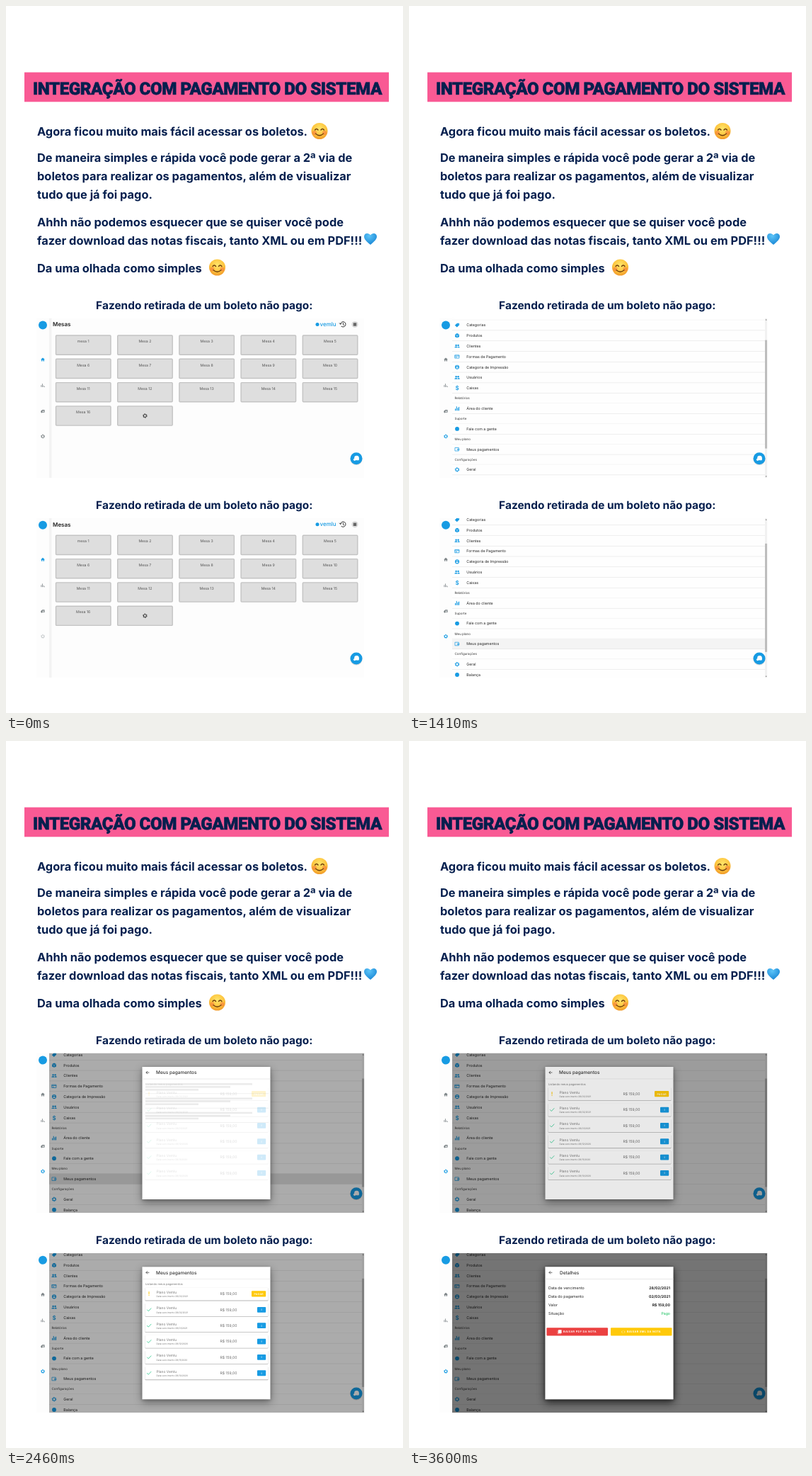
Recreate the animation shown at these times as an HTML page. Size 561 by 998 pixels, loop 3630 ms.

```html
<!DOCTYPE html>
<html lang="pt-BR">
<head>
<meta charset="utf-8">
<title>Integração com pagamento do sistema</title>
<style>
  html, body { margin: 0; width: 100%; height: 100%; overflow: hidden; background: #fff; }
  svg { display: block; width: 100%; height: 100%; font-family: Inter, "Open Sans", sans-serif; text-rendering: geometricPrecision; }
  .dialog { filter: drop-shadow(0 1px 2px rgba(0, 0, 0, .25)) drop-shadow(0 4px 6px rgba(0, 0, 0, .38)); }
</style>
</head>
<body>
<svg id="stage" viewBox="0 0 561 998"></svg>
<script>
const LOOP = 3630, STEP = 30, PANEL_GAP = 282.3, SCROLL = 48.5, RISE = 12.8;
const NAVY = '#051f4e', BLUE = '#179be3', GREY = '#7d8487', YELLOW = '#ffc90a';

// ---- drawing helpers -------------------------------------------------
const rect = (x, y, w, h, fill, extra = '') =>
  `<rect x="${x}" y="${y}" width="${w}" height="${h}" fill="${fill}" ${extra}/>`;
const circle = (x, y, r, fill, extra = '') =>
  `<circle cx="${x}" cy="${y}" r="${r}" fill="${fill}" ${extra}/>`;
const text = (x, y, size, str, fill = '#222', weight = 400, anchor = 'start', extra = '') =>
  `<text x="${x}" y="${y}" font-size="${size}" fill="${fill}" font-weight="${weight}" text-anchor="${anchor}" ${extra}>${str}</text>`;
const line = (d, width, color = 'currentColor') =>
  `<path d="${d}" fill="none" stroke="${color}" stroke-width="${width}" stroke-linecap="round" stroke-linejoin="round"/>`;
const shape = (d, fill = 'currentColor') => `<path d="${d}" fill="${fill}"/>`;
const group = (name, body, extra = '') => `<g class="${name}" ${extra}>${body}</g>`;
const at = (x, y, body, color = BLUE, scale = 1, name = '') =>
  `<g class="${name}" transform="translate(${x} ${y}) scale(${scale})" style="color:${color}">${body}</g>`;
const times = (n, fn) => Array.from({ length: n }, (_, i) => fn(i)).join('');

// Icons are centred on 0,0 and about 7 units wide.
const icons = {
  gear: circle(0, 0, 2.1, 'none', 'stroke="currentColor" stroke-width="1.2"') +
    circle(0, 0, 3, 'none', 'stroke="currentColor" stroke-width=".9" stroke-dasharray="1.7 1.44"'),
  home: shape('M-3.2 .1L0-2.9 3.2 .1H2.2V2.8H.7V.9H-.7V2.8H-2.2V.1Z'),
  chart: line('M-2.4 2.2V0M-.6 2.2V-2.2M1.2 2.2V.6M2.6 2.2H2.8', .9),
  truck: shape('M-3 1.9V-.4L-.8-2.2H2.8V1.9Z') + circle(.5, .2, 1, '#fff') + circle(-1.7, 1.9, .8, 'currentColor'),
  tag: shape('M-3.4 .4L.1-3 3-2.8 3.3-.2-.2 3.2Z') + circle(1.8, -1.6, .5, '#fff'),
  box: shape('M0-3.4L3.1-1.8V1.8L0 3.4-3.1 1.8V-1.8Z') + line('M-2.7-1.5L0 0 2.7-1.5M0 0V3', .5, '#fff'),
  people: circle(-1.5, -1.2, 1.3, 'currentColor') + circle(1.7, -1.2, 1.3, 'currentColor') +
    shape('M-3.7 2.3V1.4Q-1.5-.3 .4 1.4V2.3ZM.9 2.3V1.2Q2.6-.1 3.8 1.4V2.3Z'),
  card: line('M-3-2.2H3V2.3H-3ZM-3-.8H3M-2 1H-.6', .8),
  print: circle(0, 0, 3.2, 'currentColor') + rect(-1.6, .1, 3.2, 1.7, '#fff') + rect(-1.5, -2, 3, .8, '#fff'),
  money: text(0, 3, 8.4, '$', 'currentColor', 600, 'middle'),
  bars: line('M-2.6 2.7V.6M-.8 2.7V-2.7M1 2.7V-.7M2.7 2.7V-1.8', 1.1),
  dot: circle(0, 0, 3.1, 'currentColor'),
  wallet: line('M-2.8-2.3H2.4V2.5H-2.8ZM.8-.4H3V1.1H.8Z', .75),
  back: line('M2 0H-2M-.2-1.8L-2 0-.2 1.8', .7),
};

// ---- poster ----------------------------------------------------------
const smiley = (x, y) => at(x, y,
  circle(0, 0, 11.5, 'url(#face)') +
  circle(-7, 2.6, 3, '#f4663c', 'opacity=".45"') + circle(7, 2.6, 3, '#f4663c', 'opacity=".45"') +
  line('M-6.4-1.5Q-4.2-4.6-2-1.5M2-1.5Q4.2-4.6 6.4-1.5', 1.4, '#6b3b0c') +
  line('M-5.6 3.6Q0 9 5.6 3.6', 1.3, '#6b3b0c'));

const paragraphs = [
  [182.5, 'Agora ficou muito mais fácil acessar os boletos.'],
  [219.5, 'De maneira simples e rápida você pode gerar a 2ª via de'],
  [245.5, 'boletos para realizar os pagamentos, além de visualizar'],
  [271.5, 'tudo que já foi pago.'],
  [310.5, 'Ahhh não podemos esquecer que se quiser você pode'],
  [336.5, 'fazer download das notas fiscais, tanto XML ou em PDF!!!'],
  [375.5, 'Da uma olhada como simples'],
];

const poster =
  rect(26, 93.6, 515, 41.7, '#f95a94') +
  text(284.5, 125, 24.2, 'INTEGRAÇÃO COM PAGAMENTO DO SISTEMA', NAVY, 900, 'middle',
    `font-family="Roboto, sans-serif" letter-spacing="-.5" stroke="${NAVY}" stroke-width=".6"`) +
  paragraphs.map(([y, str]) => text(44, y, 16.4, str, NAVY, 700)).join('') +
  smiley(443, 176.5) + smiley(298.5, 369) +
  shape('M515 337C509 332 506 329 506 325.5C506 320 512.5 319.5 515 323.5C517.5 319.5 524 320 524 325.5C524 329 521 332 515 337Z', 'url(#heart)');

// ---- app screens -----------------------------------------------------
const sidebar = rect(43, 440, 18, 226, '#fdfdfd') + circle(52, 450.5, 6, BLUE) +
  at(52, 499, icons.home, GREY, .9, 'home') + at(52, 535.5, icons.chart, GREY, .9) +
  at(52, 572, icons.truck, GREY, .9) + at(52, 607.5, icons.gear, GREY, .85, 'settings');

const tables = rect(61, 440, 445, 226, '#fdfdfd') + rect(61, 440, 3.5, 226, '#f3f3f3') +
  text(66, 452.3, 8, 'Mesas', '#222', 600) +
  circle(440, 449.5, 2.5, BLUE) + text(443.5, 452, 8, 'vemlu', BLUE, 500) +
  at(476, 449.3, line('M-3.4-.5A3.7 3.7 0 1 1-2 3M-4.6-1.5L-3.4 0-2-1.2M.4-1.8V.3L1.8 1.2', 1), '#333') +
  circle(493, 449.5, 4.6, '#dcdcdc') + rect(490.8, 447.3, 4.4, 4.4, '#666') +
  times(17, i => {
    const x = 70.5 + 87.2 * (i % 5), y = 465 + 33.3 * Math.floor(i / 5);
    return rect(x, y, 77.5, 27.2, '#dedede', 'rx="1" stroke="#c3c3c3" stroke-width="1.4"') +
      (i < 16 ? text(x + 38.7, y + 10.2, 5.2, `${i ? 'Mesa' : 'mesa'} ${i + 1}`, '#555', 400, 'middle')
              : at(x + 38.7, y + 13.6, icons.gear, '#444', .95));
  });

const menuRows = [
  'Cadastros', ['tag', 'Categorias'], ['box', 'Produtos'], ['people', 'Clientes'],
  ['card', 'Formas de Pagamento'], ['print', 'Categoria de Impressão'], ['people', 'Usuários'], ['money', 'Caixas'],
  'Relatórios', ['bars', 'Área do cliente'],
  'Suporte', ['dot', 'Fale com a gente'],
  'Meu plano', ['wallet', 'Meus pagamentos'],
  'Configurações', ['gear', 'Geral'], ['dot', 'Balança'],
];

function menuList() {
  let y = 470;
  return menuRows.map(row => {
    const heading = typeof row === 'string', height = heading ? 14 : 14.8, mid = y + height / 2;
    const active = row[1] === 'Meus pagamentos' ?
      group('hover', rect(61, y, 442, height, '#f4f4f4')) + group('ripple', rect(61, y, 0, height, '#000', 'opacity=".16"')) : '';
    y += height;
    return active + rect(61, y - .25, 442, .5, heading ? '#ececec' : '#dcdcdc') + (heading
      ? text(64.5, mid + 1.6, 4.5, row, '#333')
      : at(68, mid, icons[row[0]], BLUE, .95) + text(81.3, mid + 1.9, 5.25, row[1]));
  }).join('');
}

const menu = rect(61, 440, 445, 226, '#fefefe') +
  group('scroller',
    circle(75.7, 454, 10, '#13b5dc') +
    text(496, 448.8, 5.1, '<tspan font-weight="700">Bar Tulveca</tspan> #2080', '#333', 400, 'end') +
    text(496, 454.8, 4.4, '12.345.678/0001-00', '#444', 400, 'end') +
    text(496, 460.5, 3.9, 'Logado como Usuário', '#444', 400, 'end') +
    rect(61, 466, 442, .5, '#e2e2e2') + menuList()) +
  rect(503, 440, 3.3, 226, '#f1f1f1') + group('thumb', rect(503, 445, 3.3, 153, '#bdbdbd')) +
  shape('M503.7 443.5L504.7 442 505.7 443.5ZM503.7 663.5L504.7 665 505.7 663.5Z', '#666');

const fab = circle(495, 639.5, 8.6, '#000', 'opacity=".15"') + circle(495, 638.7, 8.5, BLUE) +
  circle(495.5, 638, 3.3, '#fff') + rect(495.5, 638, 3.3, 3.3, '#fff', 'rx=".5"') + circle(492.7, 640.3, 1.7, '#fff');

const dialogFrame = (title, x, content) =>
  rect(192.5, 460, 181, 187, '#fff', 'class="dialog"') +
  at(200, 468, icons.back, '#333') + text(x, 470.3, 6.5, title, '#333', 500) +
  rect(192.5, 476.7, 181, .7, '#dedede') + content;

const skeleton = times(3, i => {
  const y = 483.1 + 20.3 * i;
  return [151, 120, 75].map((w, k) => rect(197, y + 4 * k, w, 2.5, '#e6e6e6')).join('') +
    rect(197, y + 14.5, 174, .5, '#dcdcdc');
});

const dueDates = ['28/03/2021', '28/02/2021', '28/01/2021', '28/12/2020', '28/11/2020', '28/10/2020'];
const payments = rect(193, 477.5, 180, 169, '#fff') +
  text(197, 485.6, 4.05, 'Listando meus pagamentos', '#777') +
  dueDates.map((date, i) => {
    const y = 498 + 22.35 * i;
    return rect(196.5, y - 8.6, 174, 18.7, '#b5b5b5', 'rx="1"') + rect(196.5, y - 9, 174, 18.3, '#fff', 'rx="1"') +
      text(212.5, y - .3, 4.9, 'Plano Vemlu', '#777') +
      text(212.5, y + 5, 3.25, `Data vencimento ${date}`, '#777') +
      text(302.5, y + 2, 5.1, 'R$ 159,00', '#666') +
      (i ? line(`M199.5 ${y + .3}l1.8 1.9 3.7-4`, .8, '#2ecc8f') +
           rect(355, y - 3.7, 12.2, 7.8, BLUE, 'rx="1"') + text(361, y + 1.7, 4.3, 'i', '#fff', 600, 'middle')
         : text(202, y + 3, 8, '!', YELLOW, 600, 'middle') +
           rect(347, y - 4, 20.2, 8.2, YELLOW, 'rx="1"') +
           text(357.2, y + 1.5, 3.6, 'PAGAR', '#fff', 600, 'middle', 'letter-spacing=".3"'));
  }).join('');

const detailRows = [
  ['Data de vencimento', '28/02/2021'], ['Data do pagamento', '02/03/2021'], ['Valor', 'R$ 159,00'], ['Situação', 'Pago'],
];
const fileButton = (x, fill, label) => rect(x, 546, 86.5, 11.3, fill, 'rx="1"') +
  text(x + 47, 553.2, 3.9, label, '#fff', 600, 'middle', 'letter-spacing=".3"');
const details = detailRows.map(([label, value], i) => {
  const y = 491.5 + 12.1 * i, paid = value === 'Pago';
  return text(197, y, 5.4, label) + text(369, y, 5.2, value, paid ? '#2dc76d' : '#222', paid ? 500 : 700, 'end');
}).join('') +
  fileButton(194.5, '#eb4141', 'BAIXAR PDF DA NOTA') + rect(211, 549, 4.6, 4.6, '#fff', 'rx=".5"') +
  line('M210.2 550V554.5H214.5', .5, '#fff') +
  fileButton(285, YELLOW, 'BAIXAR XML DA NOTA') + line('M301.5 550.5l-1.2 1.3 1.2 1.3M304 550.5l1.2 1.3-1.2 1.3', .5, '#fff');

const backdrop = name => group(name, rect(61, 440, 445.5, 226, '#000'));

const panel = index => group('panel',
  text(280.3, 428, 15.45, 'Fazendo retirada de um boleto não pago:', NAVY, 700, 'middle') +
  group('', sidebar + group('', tables + group('menu', menu) + fab +
    backdrop('shade1') +
    group('list', dialogFrame('Meus pagamentos', 212, skeleton + group('payments', payments))) +
    backdrop('shade2') +
    group('details', dialogFrame('Detalhes', 213, details)), 'clip-path="url(#page)"'),
    'clip-path="url(#screen)"'),
  `transform="translate(0 ${index * PANEL_GAP})"`);

const stage = document.getElementById('stage');
stage.innerHTML = `<defs>
  <radialGradient id="face" cx=".5" cy=".35" r=".68"><stop offset="0" stop-color="#ffe66b"/><stop offset=".6" stop-color="#fdc53f"/><stop offset="1" stop-color="#ef9426"/></radialGradient>
  <radialGradient id="heart" cx=".4" cy=".25" r=".8"><stop offset="0" stop-color="#5cc4f8"/><stop offset="1" stop-color="#1583d3"/></radialGradient>
  <clipPath id="screen"><rect x="43" y="440.5" width="463.5" height="225.7"/></clipPath>
  <clipPath id="page"><rect x="61" y="440.5" width="445.5" height="225.7"/></clipPath>
</defs>` + poster + panel(0) + panel(1);

// ---- motion ----------------------------------------------------------
const schedules = [
  { press: 360, menu: 660, scroll: [1230, 1470], list: 2190, shade2: 3579, details: 3600 },
  { press: 0, menu: 120, scroll: [780, 1040], list: 1500, shade2: 2725, details: 2725 },
];
const clamp = v => Math.min(1, Math.max(0, v));
const progress = (t, start, end) => clamp((t - start) / (end - start));
const enter = (t, start) => 1 - (1 - progress(t, start, start + 210)) ** 3;
const smooth = p => p * p * (3 - 2 * p);

const panels = [...document.querySelectorAll('.panel')].map((root, i) => {
  const find = name => root.querySelector('.' + name);
  const fade = (name, opacity) => find(name).setAttribute('opacity', opacity);
  const shift = (name, y) => find(name).setAttribute('transform', `translate(0 ${y})`);
  const appear = (name, p) => { fade(name, p); shift(name, RISE * (1 - p)); };
  const when = schedules[i];

  return t => {
    const open = t >= when.menu;
    find('home').style.color = open ? GREY : BLUE;
    find('settings').style.color = open ? BLUE : t >= when.press ? '#c9cdcf' : GREY;
    appear('menu', enter(t, when.menu));

    const scroll = SCROLL * smooth(progress(t, ...when.scroll));
    shift('scroller', -scroll);
    shift('thumb', scroll * .65);

    fade('hover', t >= when.scroll[1] && t < when.list ? 1 : 0);
    fade('ripple', t >= when.list ? 1 - progress(t, when.list + 200, when.list + 420) : 0);
    find('ripple').firstChild.setAttribute('width', Math.min(442, 284 + Math.max(0, t - when.list) * 1.53));

    fade('shade1', .33 * enter(t, when.list));
    appear('list', enter(t, when.list));
    fade('payments', progress(t, when.list + 240, when.list + 390));
    fade('shade2', .32 * enter(t, when.shade2));
    appear('details', enter(t, when.details));
  };
});

function frame() {
  const t = Math.floor(performance.now() % LOOP / STEP) * STEP;
  panels.forEach(update => update(t));
  requestAnimationFrame(frame);
}
frame();
</script>
</body>
</html>
```
